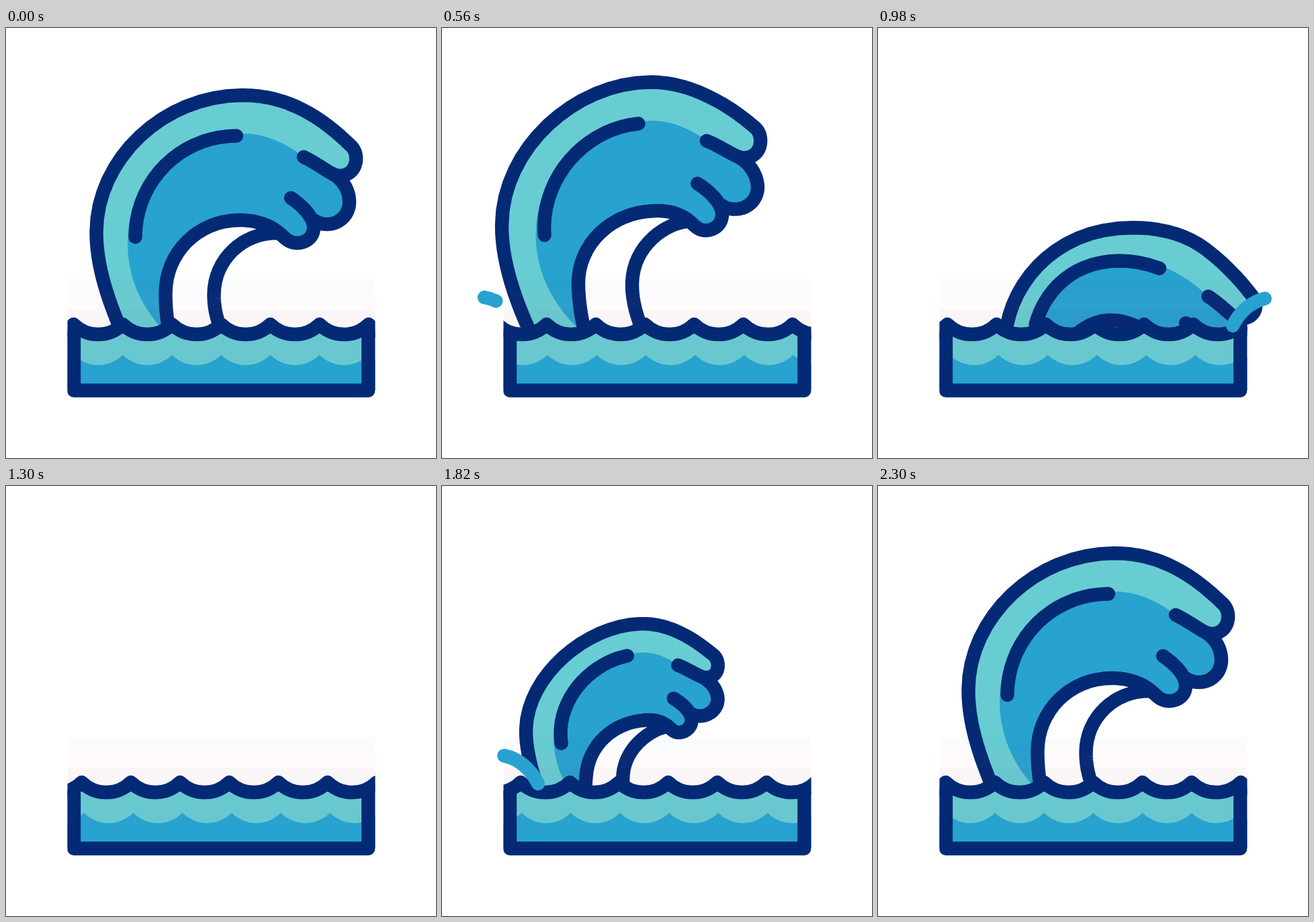
Recreate the animation shown at these times as an HTML page. Size 640 by 640 pixels, loop 2.4 s.

```html
<!DOCTYPE html>
<html lang="en">
<head>
<meta charset="utf-8">
<title>Wave</title>
<style>
html, body { margin: 0; width: 100%; height: 100%; overflow: hidden; background: #fff; }
svg { display: block; width: 100vw; height: 100vh; }
path { stroke-width: 20.4; stroke-linecap: round; stroke-linejoin: round; }
.line { fill: none; stroke: #042a75; }
.splash { fill: none; stroke: #28a2cf; }
</style>
</head>
<body>
<svg viewBox="0 0 640 640">
  <defs>
    <clipPath id="air"><rect width="640" height="452"/></clipPath>
    <clipPath id="tank"><rect x="91.5" y="400" width="458" height="151"/></clipPath>
  </defs>
  <g clip-path="url(#air)">
    <path id="body" fill="#68cdd2"/>
    <path id="blue" fill="#28a2cf"/>
    <path id="lines" class="line"/>
    <path id="glint" class="line"/>
  </g>
  <rect x="92" y="374" width="457" height="20" fill="#0a3c9b" opacity=".02"/>
  <rect x="92" y="394" width="457" height="25" fill="#ff3c78" opacity=".02"/>
  <rect x="92" y="419" width="457" height="31" fill="#740521" opacity=".036"/>
  <g clip-path="url(#tank)">
    <path id="shallow" fill="#69c8cf"/>
    <path id="deep" fill="#28a2cf"/>
    <path d="M101 457V539.5H539.3V457" class="line"/>
    <path id="surface" class="line"/>
  </g>
  <g id="splashes"></g>
</svg>
<script>
const LOOP = 2400;
const $ = id => document.getElementById(id);
const clamp = v => Math.max(0, Math.min(1, v));

// Wave drawing in its resting pose
const outer = 'C160 425 134.5 365 134.5 304C134.5 195 235 100 352 100C420 100 470 133 514 176' +
  'C524 186 523 204 514 213C506 221 494 222 484 216';
const fingers = 'C500 224 511 240 511 259C511 278 496 292 478 292C470 292 464 290 458 286L458 297';
const arch = 'C458 311 447 320 433 320C423 320 416 314 410 308C394 293 372 286 348 286' +
  'C285 286 237.5 335 237.5 395C237.5 430 243 455 250 480';
const body = 'M184 480' + outer + fingers + arch;
const blue = 'M443 192C458 199 470 208 484 216' + fingers + arch +
  'L258 470C205 430 181 375 181 320C181 230 250 157 350 157C385 157 415 170 443 192';
const lines = body + 'M484 216C470 208 458 199 443 192M424 253C442 265 458 282 458 297' +
  'M336 480C318 450 309.5 425 309.5 397C309.5 345 352 304 405 305';

// Curves become fine runs of points, so that bending them stays smooth
function sample(d) {
  const out = [];
  let pen;
  for (const [, cmd, args] of d.matchAll(/([MLC])([^MLC]+)/g)) {
    const v = args.trim().split(' ').map(Number);
    if (cmd === 'C') {
      for (let i = 1; i <= 16; i++) {
        const u = i / 16, w = 1 - u;
        out.push(['L', ...[0, 1].map(k => w ** 3 * pen[k] + 3 * w * w * u * v[k] +
          3 * w * u * u * v[k + 2] + u ** 3 * v[k + 4])]);
      }
    } else out.push([cmd, ...v]);
    pen = v.slice(-2);
  }
  return out;
}
const shapes = Object.entries({ body, blue, lines }).map(([id, d]) => [id, sample(d)]);

// Key points: back, crest, shoulder, crease, tip, two fingers, arch top, arch side, two feet
const rest = [[134.5, 304], [352, 100], [442, 122], [443, 192], [521, 193], [511, 259],
  [433, 320], [348, 286], [237.5, 395], [167, 437], [317, 437]];
const left = [[86, 302], [303, 96.5], [387, 118], [383, 181], [461, 178], [457, 245],
  [383, 310], [306, 282], [197, 390], [121, 440], [286, 440]];
const lean = [[173.5, 345], [380, 134], [482, 162], [497, 250], [570, 265], [545, 322],
  [462, 367], [358, 308], [252, 418], [193, 438], [318, 450]];
const rise = [[125, 363], [294, 205.5], [354, 219], [351, 267], [410, 264], [410, 315],
  [354, 367], [300, 349], [214.5, 432], [150, 467], [272, 455]];
const move = (pose, f) => pose.map(([x, y]) => f(x, y));
const high = move(left, (x, y) => [x + 3 + (x - 86) * .026, y - 4 - (450 - y) * .034]);
const sunk = move(lean, (x, y) => [330 + (x - 330) * .85, 470 + (y - 134) * .6]);
const seed = move(rise, (x, y) => [190 + (x - 190) * .3, 540 + (y - 450) * .3]);

// Time, pose, and how far the glint has slid round its circle in degrees
const keys = [[0, rest, 0], [40, rest, 0], [320, left, -4], [560, high, -4], [800, lean, 16],
  [1200, sunk, 16], [1480, seed, -7], [1820, rise, -7], [2210, rest, 0], [LOOP, rest, 0]]
  .map(([t, pose, slide]) => [t, [...pose.flat(), slide]]);

// Monotone cubic interpolation between keys
function poseAt(t) {
  let k = 0;
  while (k < keys.length - 2 && t >= keys[k + 1][0]) k++;
  const rate = (j, i) => j < 0 || j > keys.length - 2 ? 0 :
    (keys[j + 1][1][i] - keys[j][1][i]) / (keys[j + 1][0] - keys[j][0]);
  const slope = (a, b) => a * b <= 0 ? 0 : 2 * a * b / (a + b);
  const h = keys[k + 1][0] - keys[k][0], u = (t - keys[k][0]) / h, v = 1 - u;
  return keys[k][1].map((a, i) => {
    const b = keys[k + 1][1][i], d = rate(k, i);
    const m0 = slope(rate(k - 1, i), d), m1 = slope(d, rate(k + 1, i));
    return a * v * v * (1 + 2 * u) + b * u * u * (3 - 2 * u) + h * u * v * (m0 * v - m1 * u);
  });
}

// Gauss-Jordan elimination with two right-hand sides
function solve(m) {
  const n = m.length;
  for (let c = 0; c < n; c++) {
    let p = c;
    for (let r = c + 1; r < n; r++) if (Math.abs(m[r][c]) > Math.abs(m[p][c])) p = r;
    [m[c], m[p]] = [m[p], m[c]];
    for (let r = 0; r < n; r++) {
      if (r === c) continue;
      const f = m[r][c] / m[c][c];
      for (let k = c; k < n + 2; k++) m[r][k] -= f * m[c][k];
    }
  }
  return m.map((row, i) => [row[n] / row[i], row[n + 1] / row[i]]);
}

// Thin-plate spline that carries the resting key points onto a pose
const basis = (x, y) => rest.map(([a, b]) => {
  const d = (x - a) ** 2 + (y - b) ** 2;
  return d ? d * Math.log(d) : 0;
}).concat(1, x, y);
function warper(pose) {
  const rows = rest.map(([x, y], i) => [...basis(x, y), pose[2 * i], pose[2 * i + 1]]);
  for (const f of [() => 1, p => p[0], p => p[1]])
    rows.push([...rest.map(f), 0, 0, 0, 0, 0]);
  const w = solve(rows);
  return (x, y) => {
    const b = basis(x, y);
    return [0, 1].map(k => b.reduce((s, v, i) => s + v * w[i][k], 0).toFixed(2)).join(' ');
  };
}

// Scalloped water, three scallops of drift per loop
const STEP = 73.2;
const scallops = y => `M${100.6 - 2 * STEP} ${y}` + `a52 52 0 0 0 ${STEP} 0`.repeat(11);
$('surface').setAttribute('d', scallops(441));
$('shallow').setAttribute('d', scallops(441) + 'V539H-50Z');
$('deep').setAttribute('d', scallops(486.6) + 'V539H-50Z');

function ease(x) {
  x = clamp(x);
  let lo = 0, hi = 1;
  for (let i = 0; i < 24; i++) {
    const s = (lo + hi) / 2, q = 1 - s;
    if (1.65 * s * q * q + 1.35 * s * s * q + s * s * s < x) lo = s; else hi = s;
  }
  return lo * lo * (3 - 2 * lo);
}
const drift = t => `translate(${-(3 * STEP * ease(t / 2360)) % STEP} 0)`;

// Splashes: each grows along its path, then runs out at the end
const splashes = [
  [116, 'M264 446C270 418 288 386 319 383'],
  [300, 'M116 443C105 421 85 404 63 401'],
  [850, 'M528 443C539 421 559 404 585 401'],
  [1676, 'M143 443C132 421 112 404 90 401']
].map(([start, d]) => {
  const el = document.createElementNS('http://www.w3.org/2000/svg', 'path');
  el.setAttribute('d', d);
  el.setAttribute('class', 'splash');
  el.setAttribute('pathLength', 100);
  $('splashes').append(el);
  return { start, el };
});

function draw(t) {
  const pose = poseAt(t), warp = warper(pose), slide = pose[pose.length - 1];
  for (const [id, pts] of shapes)
    $(id).setAttribute('d', pts.map(([cmd, x, y]) => cmd + warp(x, y)).join(''));

  const glint = [];
  for (let a = 180; a <= 270; a += 5) {
    const r = (a + slide) * Math.PI / 180;
    glint.push(warp(343 + 150.5 * Math.cos(r), 311 + 150.5 * Math.sin(r)));
  }
  $('glint').setAttribute('d', 'M' + glint.join('L'));

  $('surface').setAttribute('transform', drift(t));
  $('shallow').setAttribute('transform', drift(t));
  $('deep').setAttribute('transform', drift(t - 18));

  for (const { start, el } of splashes) {
    const u = 2 * (t - start) / 300, head = 100 * clamp(u), tail = 100 * clamp(u - 1);
    el.style.display = head > tail ? '' : 'none';
    el.setAttribute('stroke-dasharray', `${head - tail} 300`);
    el.setAttribute('stroke-dashoffset', -tail);
  }
}

const began = performance.now();
function tick() {
  draw((performance.now() - began) % LOOP);
  requestAnimationFrame(tick);
}
tick();
</script>
</body>
</html>
```
